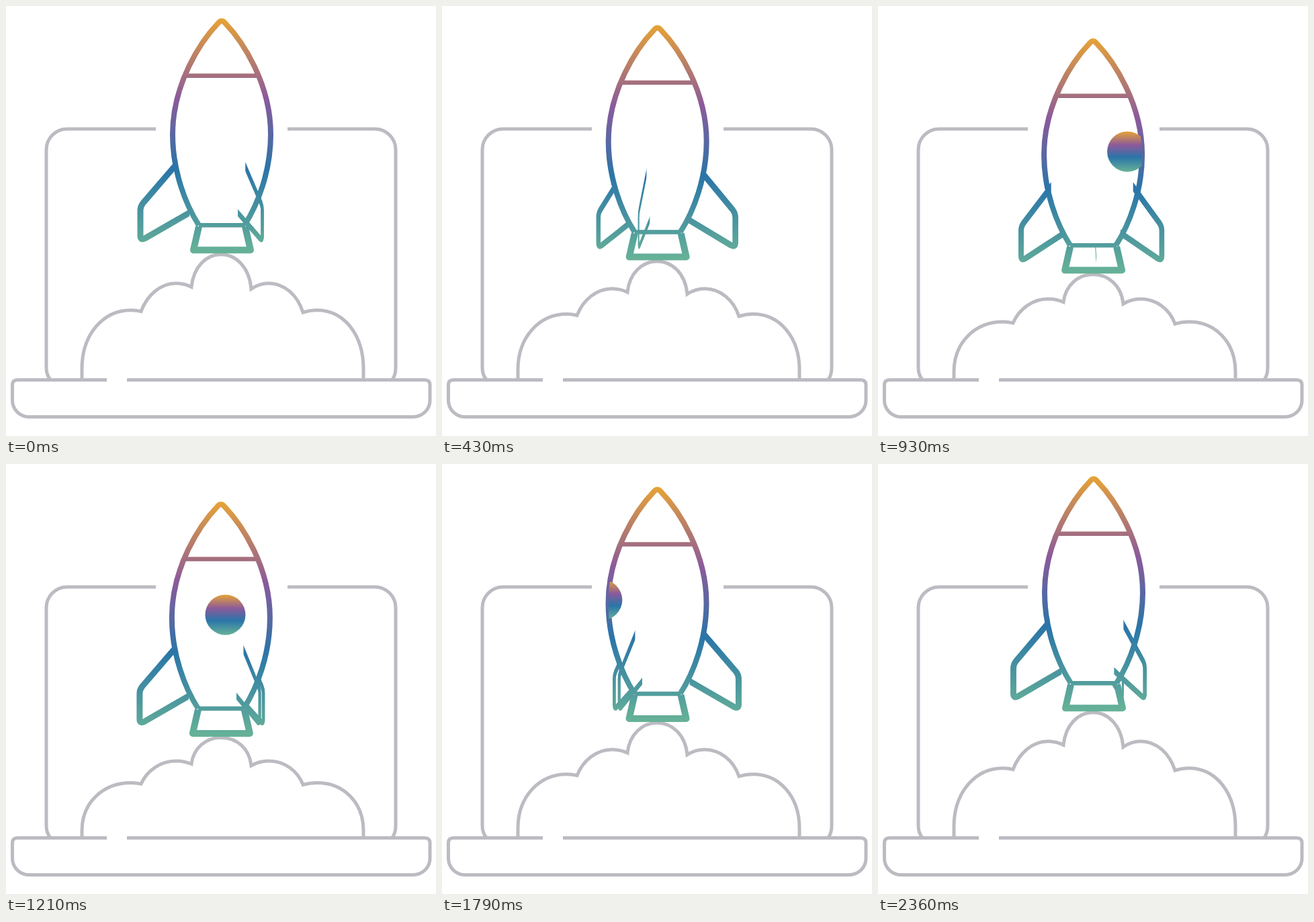
These frames come from a looping animation (640 by 640 pixels, 2.43 s). An HTML page:

```html
<!DOCTYPE html>
<html lang="en">
<head>
<meta charset="utf-8">
<title>Rocket launch</title>
<style>
  html, body { margin: 0; width: 100%; height: 100%; overflow: hidden; background: #fff; }
  svg { display: block; width: 100%; height: 100%; }
  .grey { fill: none; stroke: #bcbbc2; stroke-width: 5; }
  .hue { fill: none; stroke: url(#long); stroke-linejoin: round; }
</style>
</head>
<body>
<svg viewBox="0 0 640 640">
  <defs>
    <linearGradient id="hues">
      <stop offset="0" stop-color="#e6a336"/>
      <stop offset=".34" stop-color="#8b5a9b"/>
      <stop offset=".64" stop-color="#2a75a8"/>
      <stop offset="1" stop-color="#67b297"/>
    </linearGradient>
    <linearGradient id="long" href="#hues" gradientUnits="userSpaceOnUse" x1="0" y1="18" x2="0" y2="368"/>
    <linearGradient id="round" href="#hues" x1="0" y1="0" x2="0" y2="1"/>
    <path id="hull" d="M316 25Q321 19 326 25C352 52 394 115 394 191C394 245 375 295 355 326H287C267 295 248 245 248 191C248 115 290 52 316 25Z"/>
    <clipPath id="inside"><use href="#hull"/></clipPath>
    <clipPath id="root"><path d="M140 200H70.5V280L48 290V400H140Z"/></clipPath>
    <path id="fin" class="hue" stroke-width="9" clip-path="url(#root)"
      d="M62 229L117 293Q121 298 121 304V342Q121 349 114 345.5L36 300.5"/>
  </defs>

  <g class="grey">
    <path d="M223 183H91A31 31 0 0 0 60 214V538Q60 549 66 556"/>
    <path d="M419 183H549A31 31 0 0 1 580 214V538Q580 549 575 556"/>
    <path d="M150 556.5H17Q9.500 556.500 9.500 564V587A25 24.500 0 0 0 34 611.500H606A25 24.500 0 0 0 631 587V564Q631 556.500 623 556.500H180"/>
    <path id="cloud" vector-effect="non-scaling-stroke" d="M113 555V540C113 488 145 452.500 186 452.500Q194 452.500 201 454.500C210 430 230 412.500 253 412.500Q265 412.500 276 418C279 388 298 369.500 320 369.500S362 388 365 421Q377 412.500 391 412.500C414 412.500 434 430 442 456Q452 452.500 463 452.500C502 452.500 532 488 532 540V555"/>
  </g>

  <g id="rocket">
    <g id="back"></g>
    <use href="#hull" fill="#fff"/>
    <path class="hue" stroke-width="10" d="M287 328L279 363H364L356 328"/>
    <path class="hue" stroke-width="6.500" d="M267 103.500H376M287 326H356"/>
    <path class="hue" stroke-width="8" d="M287 326C267 295 248 245 248 191C248 115 290 52 316 25Q321 19 326 25C352 52 394 115 394 191C394 245 375 295 355 326"/>
    <g clip-path="url(#inside)"><circle id="port" cy="186.500" r="30" fill="url(#round)"/></g>
    <g id="front"></g>
  </g>
</svg>
<script>
  const LOOP = 2430, STEPS = 34, AXIS = 321;
  const $ = id => document.getElementById(id);

  const fins = [0, 120, 240].map(() => {
    const el = document.createElementNS('http://www.w3.org/2000/svg', 'use');
    el.setAttribute('href', '#fin');
    $('back').append(el);
    return el;
  });

  // [step, angle of the leading fin in degrees]
  const spin = [[0, 30], [4, -1], [9, -32], [13, -62.3], [21, -120.7], [25, -148], [33, -201], [34, -210]];

  function angleAt(i) {
    const k = spin.findIndex(p => p[0] > i);
    const [i0, a0] = spin[k - 1], [i1, a1] = spin[k];
    return a0 + (a1 - a0) * (i - i0) / (i1 - i0);
  }

  // Slow start from the top, quicker near the bottom
  function dropAt(i) {
    const u = 1 - Math.abs(i - 16.5) / 17;
    const v = 1 - u;
    return 39 * u * u * (3 - 2 * u) + 7 * u * v * v - 36 * u * u * v;
  }

  function draw(i) {
    const drop = dropAt(i);
    $('rocket').setAttribute('transform', `translate(${-drop * 0.03} ${drop})`);
    $('cloud').setAttribute('transform', `translate(0 570) scale(1 ${1 - drop / 202}) translate(0 -570)`);

    fins.forEach((fin, n) => {
      const a = (angleAt(i) + n * 120) * Math.PI / 180;
      const layer = Math.cos(a) > 0 ? $('front') : $('back');
      if (fin.parentNode !== layer) layer.append(fin);
      fin.setAttribute('transform', `translate(${AXIS} 0) scale(${Math.sin(a)} 1)`);
    });

    $('port').setAttribute('cx', 372 - 11.1 * (i - 13));
    $('port').style.display = i > 9 && i < 28 ? '' : 'none';
  }

  let start = null;
  function tick(now) {
    if (start === null) start = now;
    const t = (now - start) % LOOP;
    draw(Math.floor((t + 5) * STEPS / LOOP) % STEPS);
    requestAnimationFrame(tick);
  }
  draw(0);
  requestAnimationFrame(tick);
</script>
</body>
</html>
```
